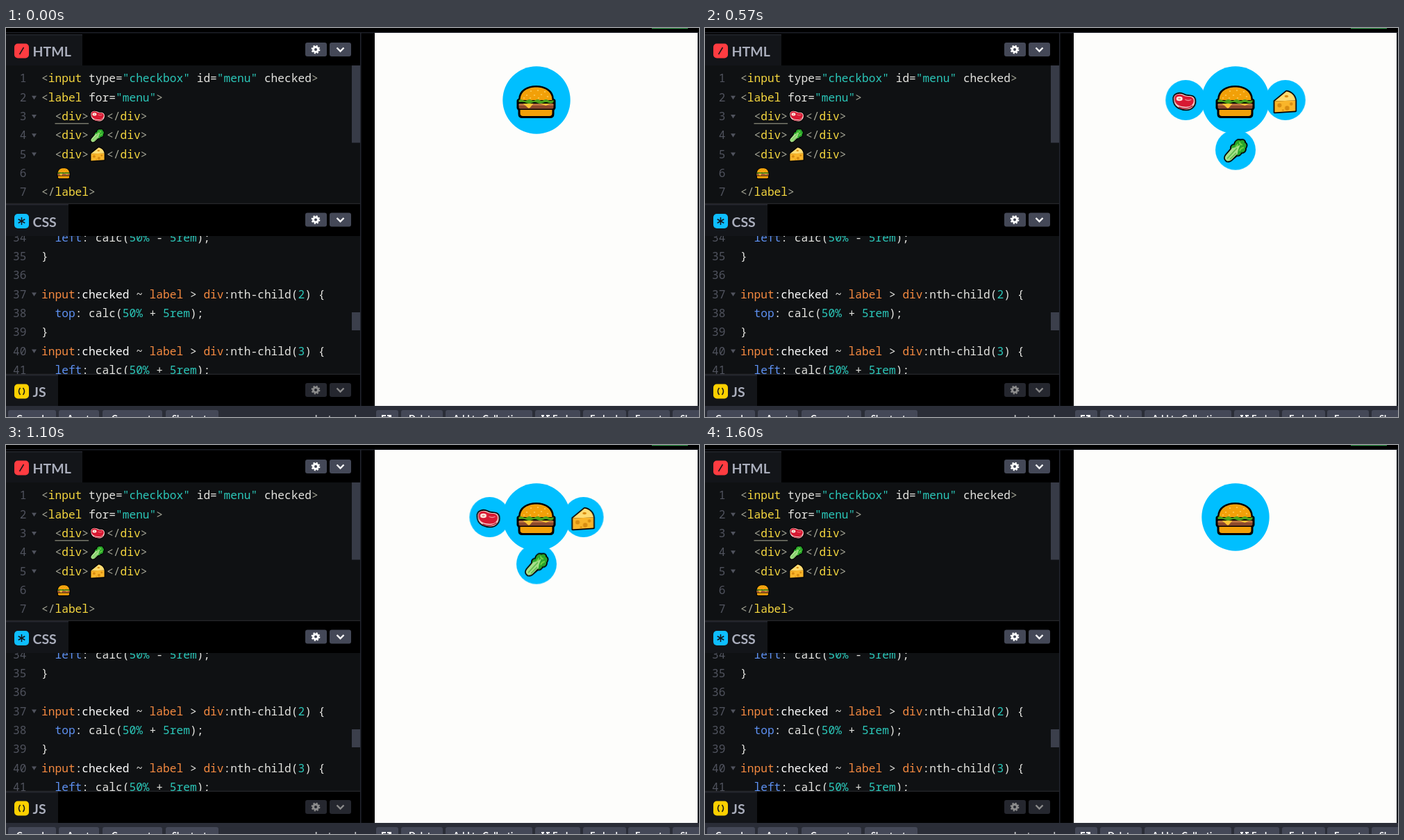
An HTML page for the animation above (1.67 s loop, 998 by 561 pixels).

```html
<!DOCTYPE html>
<html lang="en">
<head>
<meta charset="utf-8">
<title>Burger menu</title>
<style>
html, body { margin: 0; width: 100%; height: 100%; overflow: hidden; background: #000; }
svg { display: block; }
text { white-space: pre; }
.code { font: 16.22px "Noto Sans Mono", monospace; }
.tab { font: bold 19.5px Lato, sans-serif; fill: #aaaebc; }
.btn { font: bold 13px Lato, sans-serif; fill: #fff; }
.g { fill: #a3a495; }
.y { fill: #f5d73f; }
.w { fill: #e4e4e0; }
.b { fill: #fff; font-weight: 500; }
.t { fill: #2bc7b9; }
.o { fill: #f58a40; }
.p { fill: #5e91f2; }
.n { fill: #50535e; }
</style>
</head>
<body>
<svg width="998" height="561" viewBox="0 0 998 561">
  <defs>
    <clipPath id="cssClip"><rect y="300" width="498" height="199"/></clipPath>

    <g id="burger">
      <path d="M-23-3C-23-15-12-20.500 0-20.500S23-15 23-3L25.500-1V9L23.500 12V18Q23.500 21.500 20 21.500H-20Q-23.500 21.500-23.500 18V12L-25.500 9V-1Z"
        fill="#000" stroke="#000" stroke-width="5" stroke-linejoin="round"/>
      <path d="M-23-2C-23-15-12-20.500 0-20.500S23-15 23-2Z" fill="#f2a008"/>
      <path d="M-14-9h1M-8-15h1M-3-9h1M2-16h1M7-10h1M12-14h1M16-7h1M-18-5h1M-9-5h1M3-5h1" stroke="#ffcf5c" stroke-width="1.500" stroke-linecap="round"/>
      <path d="M-25-2Q-22-4-19-2T-13-2T-7-2T-1-2T5-2T11-2T17-2T25-2V1Q22 4 18 2T10 2T2 2T-6 2T-14 2T-25 1Z" fill="#4fa21b"/>
      <rect x="-25" y="3" width="50" height="7.500" rx="2" fill="#8d4a2b"/>
      <rect x="-25" y="3" width="50" height="3" rx="1" fill="#b9703f"/>
      <path d="M-19 3H-4L-9 9Q-11 11-13 8ZM6 3H20L14 6Z" fill="#ffc533"/>
      <path d="M-23 12H23V17Q23 21 19 21H-19Q-23 21-23 17Z" fill="#f2a008"/>
    </g>

    <g id="meat">
      <path id="cut" d="M-15-3C-16-11-7-13-1-10C4-7 8-9 12-7C17-4 16 4 12 8C8 13-2 12-8 9C-13 6-15 2-15-3Z" fill="#000" stroke="#000" stroke-width="3.500"/>
      <path d="M-15-3C-16-11-7-13-1-10C4-7 8-9 12-7C17-4 16 4 12 8C8 13-2 12-8 9C-13 6-15 2-15-3Z" fill="#f3d2cf"/>
      <path d="M-14-4C-14-11-7-11.500-2-9C3-6 8-8 11-6C15-3 14 2 11 5C7 9-2 8-7 6C-12 4-14 0-14-4Z" fill="#d71932"/>
      <path d="M-8 8C-2 11 7 11 12 6" fill="none" stroke="#b30f28" stroke-width="1.500"/>
      <ellipse cx="-7" cy="-4" rx="4.500" ry="3.300" fill="#fff0e8"/>
      <ellipse cx="-7" cy="-4" rx="2" ry="1.400" fill="#e59a8e"/>
      <path d="M1-3Q6 0 10-3" fill="none" stroke="#f08d96" stroke-width="1.300"/>
    </g>

    <g id="leaf">
      <path d="M-14 14C-17 11-14 7-11 4L-6-2C-7-6-4-8-1-8C-1-13 4-16 7-14C11-16 14-13 13-11C17-9 16-5 14-3C15 1 11 4 8 3C8 6 4 8 2 7L-5 13C-8 16-12 17-14 14Z" fill="#000" stroke="#000" stroke-width="3.500" stroke-linejoin="round"/>
      <path d="M-6-2C-7-6-4-8-1-8C-1-13 4-16 7-14C11-16 14-13 13-11C17-9 16-5 14-3C15 1 11 4 8 3C8 6 4 8 2 7Z" fill="#28a52b"/>
      <path d="M0-6Q3-5 3-9M6-12Q6-8 10-8M6 1Q7-3 12-4" fill="none" stroke="#70d744" stroke-width="2"/>
      <path d="M-14 14C-17 11-14 7-11 4L-5-3Q1-4 7-8Q3 0 3 5L-5 13C-8 16-12 17-14 14Z" fill="#a8e08a"/>
      <path d="M-12 12L2-3M-8 13L1 4" stroke="#55b846" stroke-width="1.500"/>
    </g>

    <g id="cheese">
      <path d="M-15-1L2-15C9-14 14-9 15-2V13L-15 15Z" fill="#000" stroke="#000" stroke-width="3.500" stroke-linejoin="round"/>
      <path d="M-15-1L2-15C9-14 14-9 15-2Z" fill="#ffdc72"/>
      <path d="M-15-1L15-2V13L-15 15Z" fill="#f9b52a"/>
      <g fill="#d88c12">
        <circle cx="-8" cy="5" r="3"/><circle cx="3" cy="9" r="3.200"/><circle cx="9" cy="3" r="2.200"/>
        <circle cx="-3" cy="12" r="1.300"/><ellipse cx="2" cy="-8" rx="2.800" ry="1.700"/>
      </g>
    </g>

    <g id="gear" fill="none" stroke="#fff">
      <circle r="3.500" stroke-width="3"/>
      <circle r="5.400" stroke-width="2" stroke-dasharray="2.120 2.120"/>
    </g>
    <path id="chevron" d="M-5-2.500L0 2.500L5-2.500" fill="none" stroke="#fff" stroke-width="2.400"/>
  </defs>

  <rect width="998" height="561"/>
  <g id="editor"></g>
  <g id="footer"></g>

  <rect x="531" y="7" width="465" height="538" fill="#fdfdfb"/>
  <rect x="996" y="7" width="2" height="538" fill="#17191f"/>
  <rect x="930" width="52" height="1.200" fill="#2f8f46"/>
  <g id="menu"></g>
</svg>

<script>
const LOOP = 1670, OPEN = 438, CLOSE = 1040, MOVE = 300;
const CHAR = 9.732, LEFT = 51, LINE = 27.33;
const $ = id => document.getElementById(id);

function add(parent, tag, attrs, text) {
  const node = document.createElementNS('http://www.w3.org/2000/svg', tag);
  for (const k in attrs) node.setAttribute(k, attrs[k]);
  if (text !== undefined) node.textContent = text;
  return parent.appendChild(node);
}
const rect = (p, x, y, width, height, fill, rx = 0) => add(p, 'rect', { x, y, width, height, fill, rx });
const use = (p, id, x, y, s = 1) => add(p, 'use', { href: '#' + id, transform: `translate(${x} ${y}) scale(${s})` });

// Tokens are split by "|"; the first letter of each is its colour class.
function code(p, x, y, tokens) {
  const line = add(p, 'text', { class: 'code', x, y });
  tokens.split('|').forEach(t => add(line, 'tspan', { class: t[0] }, t.slice(1)));
}
function gutter(p, n, y, fold) {
  add(p, 'text', { class: 'code n', x: 29.5, y, 'text-anchor': 'end' }, n);
  if (fold) add(p, 'path', { class: 'n', d: `M37 ${y - 8}h7l-3.500 5.500z` });
}

const ed = $('editor');
rect(ed, 0, 6, 998, 1.5, '#1d1f27');
rect(ed, 0, 54, 510, 198.5, '#0f1113');
rect(ed, 0, 300, 510, 198.5, '#0f1113');
rect(ed, 0, 252.5, 510, 1.5, '#25262a');
rect(ed, 0, 498.5, 510, 1.5, '#25262a');
rect(ed, 510, 7, 1.5, 538, '#22252e');
rect(ed, 498, 54, 12, 111.5, '#373b47');
rect(ed, 498, 410, 12, 26, '#3b3f4b');

// Panel headers: name, tab top, tab width, tab height, icon colour, opacity of the buttons
[
  ['HTML', 9, 110, 45, '#ff3c41', 1],
  ['CSS', 254, 90, 46, '#0ebeff', 1],
  ['JS', 500, 75, 45, '#fcd000', 0.55]
].forEach(([name, top, width, height, color, opacity], i) => {
  const mid = [33, 278.5, 524][i];
  rect(ed, 0, top, width, height, '#131519');
  rect(ed, 0, top, width, 1.5, '#24262e');
  rect(ed, 12, mid - 10.5, 21, 21, color, 5);
  const icon = [
    'M19.500 5L25.500-5',
    'M22.500-5.500V5.500M17.700-2.750L27.300 2.750M17.700 2.750L27.300-2.750',
    'M20.500-5Q16.500 0 20.500 5M24.500-5Q28.500 0 24.500 5'
  ][i];
  add(ed, 'path', { d: icon, transform: `translate(0 ${mid})`, fill: 'none', stroke: '#15161a', 'stroke-width': 1.5 });
  add(ed, 'text', { class: 'tab', x: 38.5, y: mid + 8 }, name);
  const buttons = add(ed, 'g', { opacity });
  const y = [31, 276.5, 522][i];
  rect(buttons, 431, y - 10, 31, 20, '#444857', 3);
  rect(buttons, 466, y - 10, 31, 20, '#444857', 3);
  use(buttons, 'gear', 446, y);
  use(buttons, 'chevron', 481.5, y);
});

const htmlY = n => 78.3 + (n - 1) * LINE;
[
  'g<|yinput|w type=|t"checkbox"|w id=|t"menu"|w checked|g>',
  'g<|ylabel|w for=|t"menu"|g>',
  'g  <|ydiv|g>', 'g  <|ydiv|g>', 'g  <|ydiv|g>', '',
  'g</|ylabel|g>'
].forEach((tokens, i) => {
  const y = htmlY(i + 1);
  gutter(ed, i + 1, y, i > 0 && i < 5);
  if (tokens) code(ed, LEFT, y, tokens);
  if (i > 1 && i < 5) code(ed, 145, y, 'g</|ydiv|g>');
});
rect(ed, LEFT + 2 * CHAR, 137, 5 * CHAR, 1.5, '#77786a');
use(ed, 'meat', 132, 127, 0.65);
use(ed, 'leaf', 131.5, 155, 0.6);
use(ed, 'cheese', 132, 182, 0.64);
use(ed, 'burger', 83, 209.3, 0.35);

const css = add(ed, 'g', { 'clip-path': 'url(#cssClip)' });
const rule = n => `oinput|w:|bchecked|w ~ |olabel|w > |odiv|w:nth-child(|t${n}|w) {`;
const calc = (prop, op) => `p  ${prop}|w: calc(|t50%|w ${op} |t5rem|w);`;
[calc('left', '-'), 'w}', '', rule(2), calc('top', '+'), 'w}', rule(3), calc('left', '+')]
  .forEach((tokens, i) => {
    const y = 307.6 + i * LINE;
    gutter(css, 34 + i, y, i === 3 || i === 6);
    if (tokens) code(css, LEFT, y, tokens);
  });

const foot = $('footer');
rect(foot, 0, 545, 998, 16, '#2a2d37');
[
  [3, 69, 'Console', 15], [76, 58, 'Assets', 88], [139, 86, 'Comments', 152], [230, 76, 'Shortcuts', 239],
  [533, 32, '', 0], [569, 60, 'Delete', 580], [633, 125, 'Add to Collection', 644], [762, 65, 'Fork', 787],
  [831, 62, 'Embed', 841], [896, 60, 'Export', 906], [960, 40, 'Share', 971]
].forEach(([x, w, label, tx]) => {
  rect(foot, x, 551, w, 14, '#444857', 3);
  add(foot, 'text', { class: 'btn', x: tx, y: 567.5 }, label);
});
add(foot, 'text', { class: 'btn', x: 505, y: 567.5, 'text-anchor': 'end', opacity: 0.7 }, 'Last saved');
add(foot, 'path', { d: 'M542 562V559H547M549 559H554V564M549 564L554 559M771 559H775M778 559H783M773 559V564M780 559V564', fill: 'none', stroke: '#fff', 'stroke-width': 2 });

const menu = $('menu');
const CX = 764, CY = 104, REACH = 97;
[['meat', -1, 0, -2, 2], ['leaf', 0, 1, 0, 0.5], ['cheese', 1, 0, -0.5, 2.5]].forEach(([id, dx, dy, ox, oy]) => {
  const item = add(menu, 'g', {});
  add(item, 'circle', { r: 29, fill: '#00bfff' });
  use(item, id, ox, oy);
  const shut = `translate(${CX}px, ${CY}px)`;
  const out = `translate(${CX + dx * REACH}px, ${CY + dy * REACH}px)`;
  item.animate([
    [0, shut], [OPEN, shut, 'ease'], [OPEN + MOVE, out],
    [CLOSE, out, 'ease'], [CLOSE + MOVE, shut], [LOOP, shut]
  ].map(([t, transform, easing = 'linear']) => ({ offset: t / LOOP, transform, easing })),
  { duration: LOOP, iterations: Infinity });
});
add(menu, 'circle', { cx: CX, cy: CY, r: 48.7, fill: '#00bfff' });
use(menu, 'burger', 763.5, 106);
</script>
</body>
</html>
```
